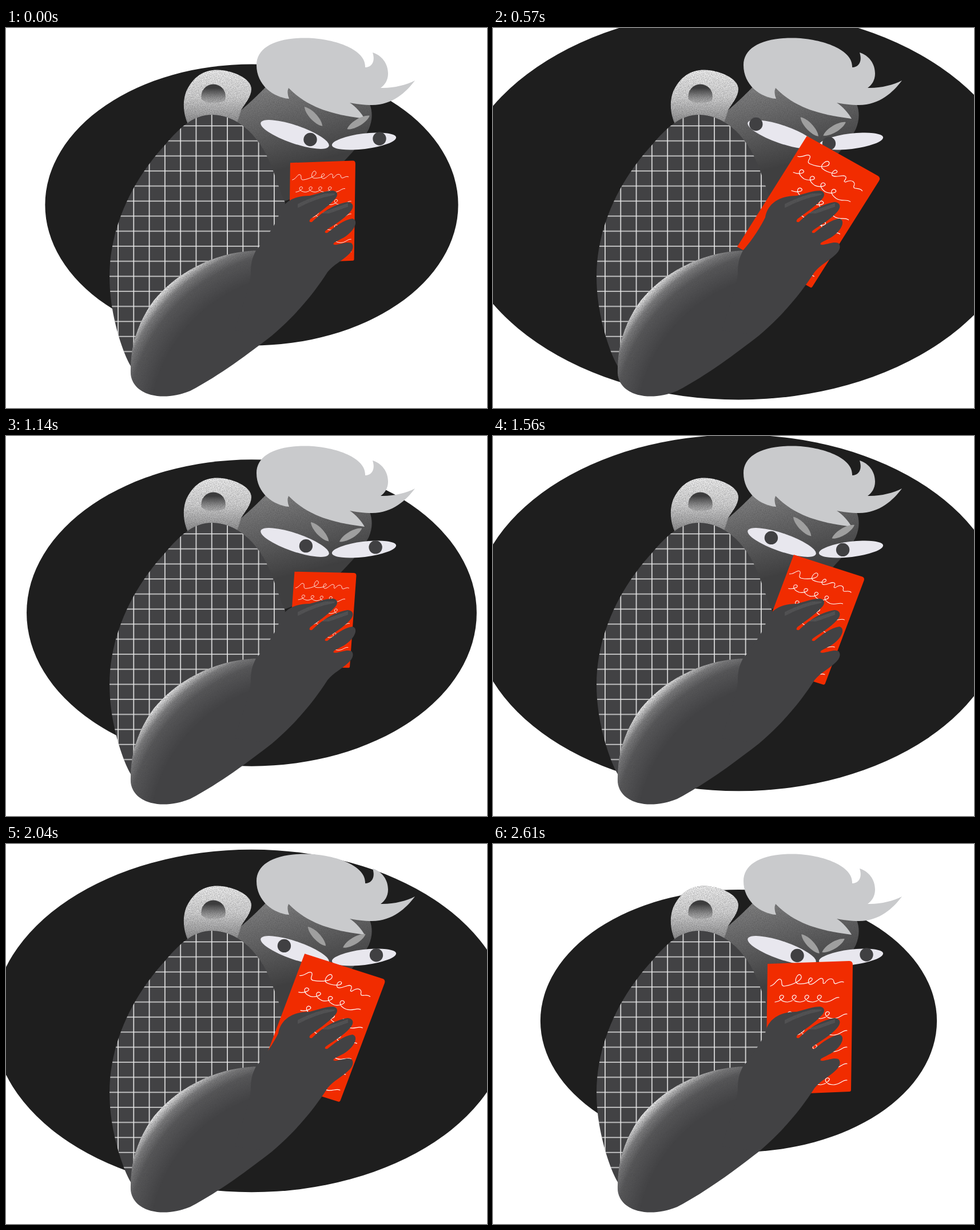
An HTML page that plays this animation: 841x666 px, repeating every 2.7 s.

```html
<!DOCTYPE html>
<html lang="en">
<head>
<meta charset="utf-8">
<title>Suspicious reader</title>
<style>
html, body { margin: 0; width: 100%; height: 100%; overflow: hidden; background: #fff; }
svg { display: block; width: 841px; height: 666px; }
</style>
</head>
<body>
<svg viewBox="0 0 841 666">
  <defs>
    <filter id="grain" x="0" y="0" width="1" height="1" color-interpolation-filters="sRGB">
      <feTurbulence type="fractalNoise" baseFrequency=".85" numOctaves="2" seed="4"/>
      <feColorMatrix values="0 0 0 0 1  0 0 0 0 1  0 0 0 0 1  0 0 0 2 -.5" result="noise"/>
      <feComposite in="SourceGraphic" in2="noise" operator="arithmetic" k1=".5" k2=".75"/>
    </filter>
    <linearGradient id="earLight" x2="0" y2="1">
      <stop stop-color="#fff" stop-opacity=".82"/>
      <stop offset=".45" stop-color="#fff" stop-opacity=".68"/>
      <stop offset="1" stop-color="#fff" stop-opacity=".25"/>
    </linearGradient>
    <linearGradient id="earHole" x2="0" y2="1">
      <stop offset=".2" stop-color="#3c3c3d"/>
      <stop offset="1" stop-color="#3c3c3d" stop-opacity=".1"/>
    </linearGradient>
    <linearGradient id="faceLight" gradientUnits="userSpaceOnUse" x1="460" y1="85" x2="500" y2="245">
      <stop stop-color="#fff" stop-opacity=".34"/>
      <stop offset="1" stop-color="#fff" stop-opacity="0"/>
    </linearGradient>
    <radialGradient id="armLight" gradientUnits="userSpaceOnUse" cx="520" cy="700" r="343">
      <stop offset=".78" stop-color="#fff" stop-opacity="0"/>
      <stop offset=".9" stop-color="#fff" stop-opacity=".1"/>
      <stop offset=".95" stop-color="#fff" stop-opacity=".27"/>
      <stop offset="1" stop-color="#fff" stop-opacity=".8"/>
    </radialGradient>
    <pattern id="checks" patternUnits="userSpaceOnUse" x="182.3" y="158.3" width="27.3" height="26.37">
      <path d="M13.65 0V27M0 13.2H28" stroke="#ececec" stroke-width="1.6"/>
    </pattern>
    <path id="ear" d="M319 170C308 148 308 120 320 102C332 82 350 73 370 73.500C395 74 430 88 429 108C428 122 418 132 411 144L400 180Z"/>
    <path id="face" d="M411 144Q436 123 463 94L625 115C642 135 643 158 634 178C618 208 590 235 560 264C535 286 508 296 486 304L395 180Z"/>
    <path id="body" d="M360 152C405 152 440 190 456 224C470 254 475 276 488 306L480 420L330 560L219 594C206 574 181 505 181 436C181 345 225 262 278 205C304 174 328 152 360 152Z"/>
    <path id="arm" d="M218 606C217 560 228 520 258 478C295 432 360 393 437 390L520 420L465 539C425 570 375 608 322 636C270 657 221 642 218 606Z"/>
    <path id="leaf" d="M-23 0C-13-8 13-8 23 0C13 8-13 8-23 0Z" fill="#9f9f9f"/>
  </defs>

  <ellipse id="backdrop" cx="429.5" cy="310" fill="#1e1e1e"/>
  <use href="#face" fill="#3f3f40"/>
  <use href="#face" fill="url(#faceLight)" filter="url(#grain)"/>
  <use href="#ear" fill="#424244"/>
  <use href="#ear" fill="url(#earLight)" filter="url(#grain)"/>
  <path d="M342 125A21.300 21.300 0 1 1 383 126C372 134 352 134 342 125Z" fill="url(#earHole)"/>
  <path d="M438 65C438 35 470 17 525 17.500C570 18 630 36 628 69C640 69 646 58 641 43C657 48 668 62 668 80C668 92 662 100 655 105C675 106 700 100 715 92C700 112 676 135 640 135C625 135 612 133 601 131C612 138 622 150 627 159C575 152 530 142 494 105C491 112 493 118 495 124C468 122 438 100 438 65Z" fill="#c9cacc"/>
  <g fill="#e8e7ee">
    <ellipse rx="63" ry="15.800" transform="translate(505 186.500)rotate(19)"/>
    <ellipse rx="56.500" ry="13.500" transform="translate(626 198.500)rotate(-7)"/>
  </g>
  <g fill="#404042">
    <circle id="leftPupil" r="11.700"/>
    <circle id="rightPupil" r="11.700"/>
  </g>
  <g id="leftBrow"><use href="#leaf" transform="rotate(47)"/></g>
  <g id="rightBrow"><use href="#leaf" transform="rotate(-31)"/></g>

  <use href="#body" fill="#424244"/>
  <use href="#body" fill="url(#checks)"/>

  <g id="book">
    <path d="M-72-112L71-117Q77-117 77-110L74 109Q74 112 71 112L-75 118Z" fill="#f12c00"/>
    <g fill="none" stroke="#fff" stroke-width="1.200" stroke-linecap="round">
      <path d="M-67-73C-58-75-56-86-50-85C-44-84-51-72-42-73C-28-75-8-84-14-92C-20-98-28-78-18-77C-8-76 8-80 6-86C2-91-4-80 2-76C10-74 18-90 24-86C28-82 22-76 28-78C36-90 44-86 44-80C46-72 54-84 61-80"/>
      <path id="scribble"/>
    </g>
  </g>

  <use href="#arm" fill="#424244"/>
  <use href="#arm" fill="url(#armLight)" filter="url(#grain)"/>
  <path d="M437 390C455 370 469 346 476 332C480 308 500 294 531 294C546 290 560 285 572 285C581 287 581 294 574 301C562 314 545 325 532 335Q528 341 535 340C550 325 570 310 597 305C608 306 609 314 602 322C590 336 574 344 559 355Q555 360 562 359C576 348 590 336 606 334C614 337 612 346 605 355C596 366 585 370 574 376Q570 380 576 380C588 378 596 374 604 377C609 382 606 390 600 396C588 408 572 415 562 428C538 466 505 505 465 539L400 530C415 480 428 450 428 428C428 410 432 400 437 390Z" fill="#424244"/>
  <path d="M510 312Q540 296 572 290M556 325L598 310" fill="none" stroke="#fff" stroke-opacity=".08" stroke-width="6" stroke-linecap="round" filter="url(#grain)"/>
</svg>
<script>
const LOOP = 2700, STEP = 30, LAST = 2610, BEAT = 600;
const el = id => document.getElementById(id);
const mix = (a, b, k) => a + (b - a) * k;

// Runs evenly from key to key, one per beat, and rests on the last.
function beats(t, ...keys) {
  const i = Math.min(Math.floor(t / BEAT), keys.length - 2);
  return mix(keys[i], keys[i + 1], Math.min(t / BEAT - i, 1));
}

function slide(id, [x0, y0], [x1, y1], k) {
  el(id).setAttribute('transform', `translate(${mix(x0, x1, k)} ${mix(y0, y1, k)})`);
}

// Handwriting: rows of looped letters with a rising tail.
const letter = 'c9-1 20-10 13-12c-7-1-8 11 9 12', tail = 'c12 0 16-9 24-8';
let rows = '';
for (let i = 0; i < 6; i++) rows += `M${i ? -45 : -59} ${29 * i - 45}` + letter.repeat(4) + tail;
el('scribble').setAttribute('d', rows);

function draw(now) {
  const t = Math.min(Math.floor(now % LOOP / STEP) * STEP, LAST);
  const swing = beats(t, 0, 1, 0, 1, 0);
  const frown = beats(t, 0, .95, .6, -.1, 1);

  const height = beats(t, 246.5, 346.5, 260, 347, 230);
  el('backdrop').setAttribute('ry', height);
  el('backdrop').setAttribute('rx', height * beats(t, 1.465, 1.46, 1.465, 1.507, 1.507));

  const size = beats(t, .765, 1.01, .695, 1, 1);
  el('book').setAttribute('transform', `translate(552 322)rotate(${33 * swing})scale(${size})`);

  slide('leftPupil', [532, 195.5], [456, 167], swing);
  slide('rightPupil', [653, 194], [584, 203], t < 3 * BEAT ? swing : Math.max(0, 2.3 * swing - 1.3));
  slide('leftBrow', [537.5, 155], [555, 175], frown);
  slide('rightBrow', [616, 165.5], [595, 178], frown);
}

const start = performance.now();
(function tick() {
  draw(performance.now() - start);
  requestAnimationFrame(tick);
})();
</script>
</body>
</html>
```
